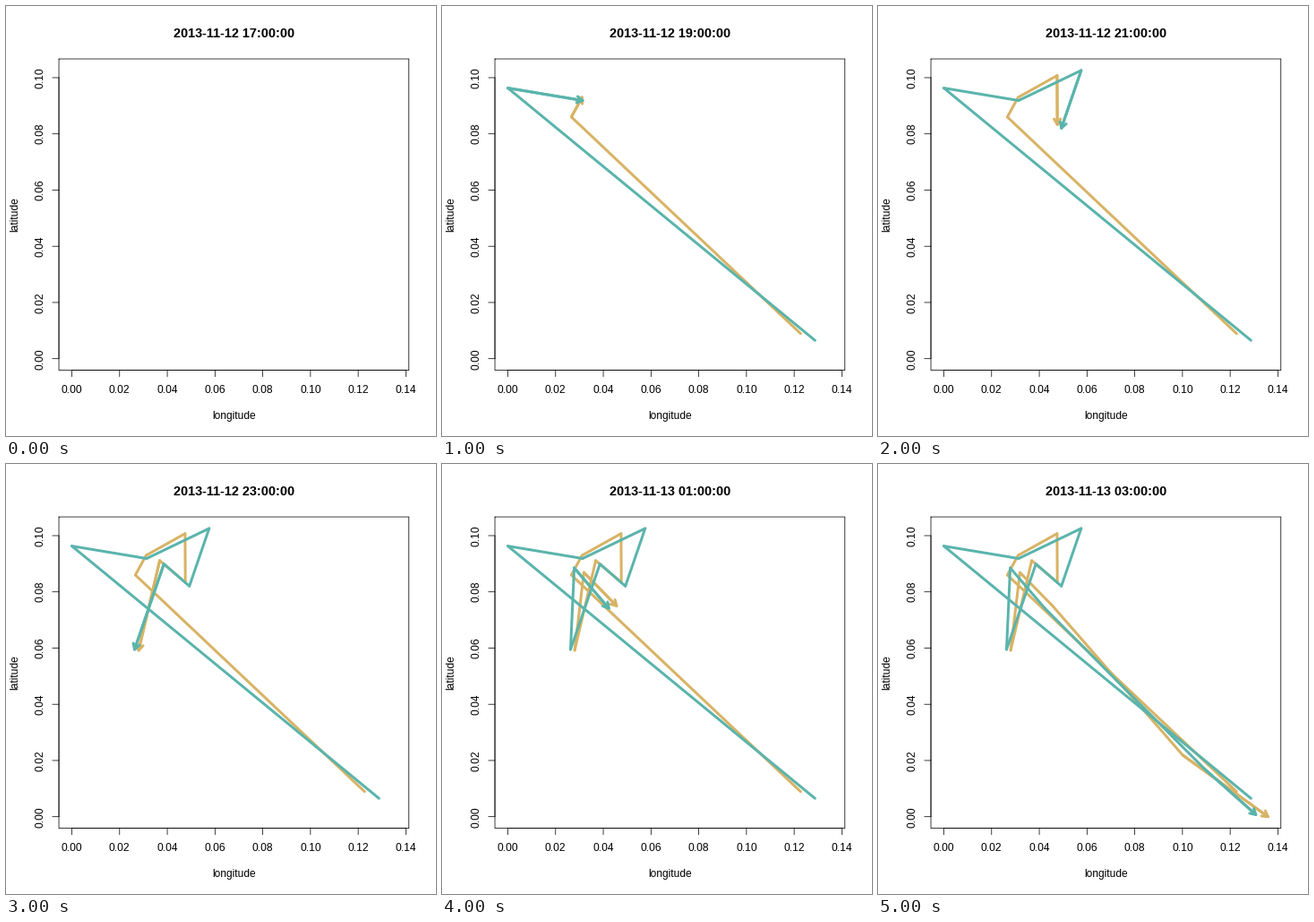
A matplotlib script that plays this animation: 480 by 480 pixels, repeating every 5500 ms.

```python
import matplotlib.pyplot as plt
import numpy as np
from matplotlib.animation import FuncAnimation

SIZE, DPI = 480, 72
LEFT, TOP, RIGHT, BOTTOM = 59.04, 59.04, 449.76, 406.56
X0, DX = 73.51, 53.27    # pixel of longitude 0, step per 0.02
Y0, DY = 393.69, -62.74  # pixel of latitude 0, step per 0.02
TICK = 7.2
STEPS = 11

# Waypoints in pixels, one per hour
TRACKS = [
    ("#D8B365", [(400.4, 365.8), (144.4, 123.9), (156.4, 102.0), (199.9, 77.7),
                 (200.2, 132.3), (171.6, 107.8), (148.1, 208.0), (158.4, 121.1),
                 (194.9, 158.4), (340.2, 325.0), (435.29, 393.69)]),
    ("#5AB4AC", [(416.4, 373.3), (73.51, 91.6), (157.0, 105.5), (226.8, 71.91),
                 (204.7, 136.3), (176.3, 111.6), (143.5, 207.0), (147.6, 116.0),
                 (186.2, 161.0), (364.3, 340.2), (421.8, 391.4)]),
]

plt.rcParams["font.family"] = "Liberation Sans"
fig = plt.figure(figsize=(SIZE / DPI, SIZE / DPI), dpi=DPI, facecolor="white")
ax = fig.add_axes([0, 0, 1, 1])
ax.set(xlim=(0, SIZE), ylim=(SIZE, 0))
ax.axis("off")


def line(points, color="black", width=0.75, z=1):
    xs, ys = zip(*points) if len(points) else ((), ())
    return ax.plot(xs, ys, color=color, lw=width, zorder=z, snap=False,
                   solid_capstyle="round", solid_joinstyle="round")[0]


def label(x, y, text, size=12, **style):
    return ax.text(x, y, text, fontsize=size, ha="center", va="baseline",
                   rotation_mode="anchor", **style)


def draw_axes():
    line([(LEFT, TOP), (RIGHT, TOP), (RIGHT, BOTTOM), (LEFT, BOTTOM), (LEFT, TOP)])
    line([(X0, BOTTOM), (X0 + 7 * DX, BOTTOM)])
    line([(LEFT, Y0), (LEFT, Y0 + 5 * DY)])
    for k in range(8):
        x = X0 + k * DX
        line([(x, BOTTOM), (x, BOTTOM + TICK)])
        label(x, 432.4, f"{0.02 * k:.2f}")
    for k in range(6):
        y = Y0 + k * DY
        line([(LEFT, y), (LEFT - TICK, y)])
        label(41.8, y, f"{0.02 * k:.2f}", rotation=90)
    label((LEFT + RIGHT) / 2, 461.2, "longitude")
    label(13, (TOP + BOTTOM) / 2, "latitude", rotation=90)


def arrow_head(start, tip, length=7.2, spread=np.pi / 6):
    back = np.arctan2(start[1] - tip[1], start[0] - tip[0])
    arms = [tip + length * np.array([np.cos(a), np.sin(a)])
            for a in (back - spread, back + spread)]
    return np.array([arms[0], tip, arms[1]])


def title_at(step):
    day, hour = divmod(17 + step, 24)
    date = f"2013-11-{12 + day}"
    return f"{date} {hour:02d}:00:00" if hour else date  # midnight shows the date only


draw_axes()
title = label((LEFT + RIGHT) / 2, 35, "", size=14.4, weight="bold")
paths = []
for n, (color, pts) in enumerate(TRACKS):
    segments = [line([], color, 3, 2 + n) for _ in range(STEPS - 1)]
    arrow = [line([], color, 3, 2 + n) for _ in range(2)]
    paths.append((np.array(pts), segments, arrow))


def update(step):
    title.set_text(title_at(step))
    for pts, segments, (shaft, head) in paths:
        for k, seg in enumerate(segments):
            seg.set_data(*pts[k:k + 2].T)
            seg.set_visible(k < step)
        for part in (shaft, head):
            part.set_visible(step > 0)
        if step:
            start, tip = pts[step - 1], pts[step]
            shaft.set_data([start[0], tip[0]], [start[1], tip[1]])
            head.set_data(*arrow_head(start, tip).T)
    return []


anim = FuncAnimation(fig, update, frames=STEPS, interval=500,
                     repeat=True, repeat_delay=0, blit=False)
plt.show()
```
